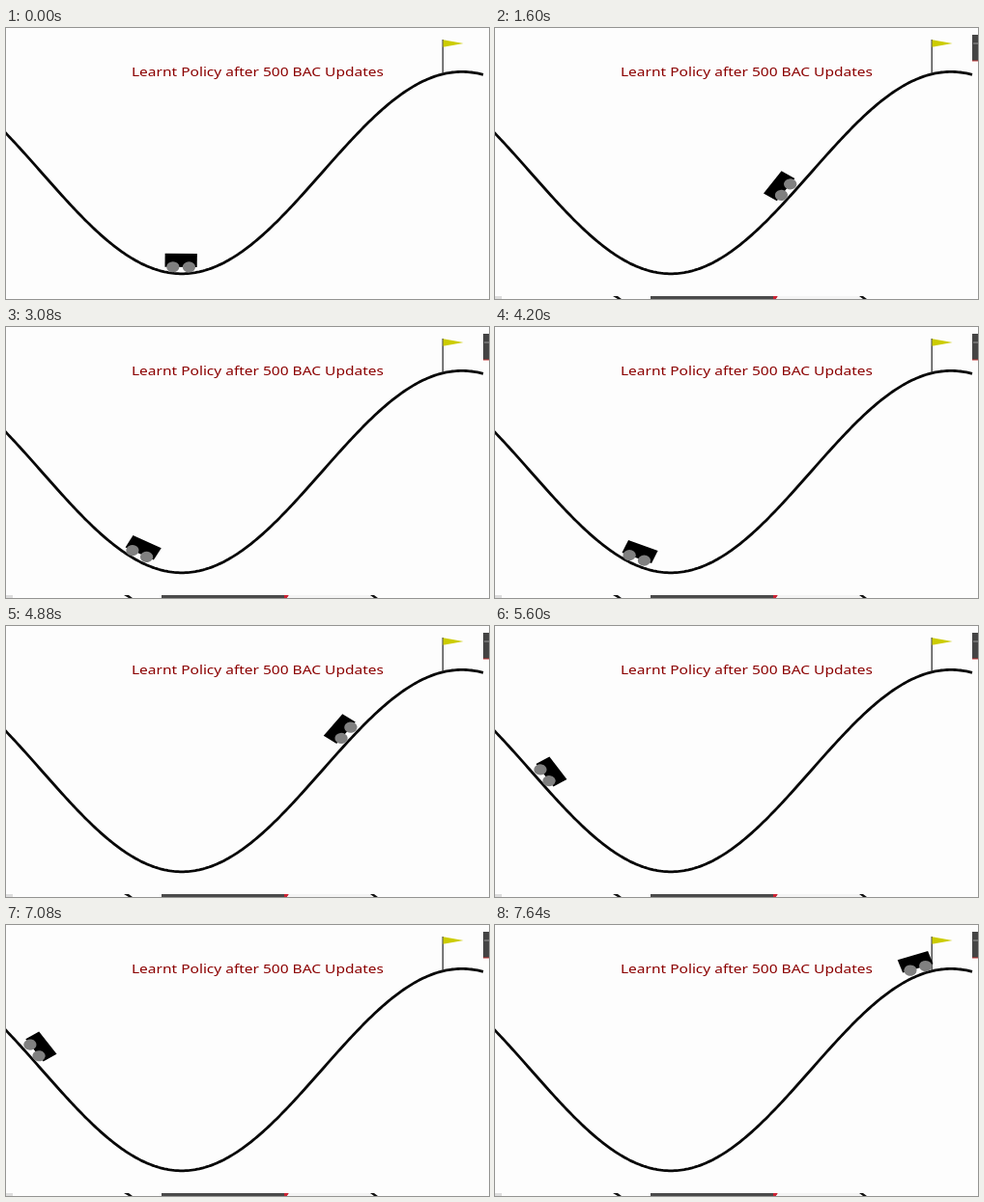
An HTML page for the animation above (7680 ms loop, 500 by 281 pixels).

```html
<!DOCTYPE html>
<html lang="en">
<head>
<meta charset="utf-8">
<title>Mountain car</title>
<style>
  html, body { margin: 0; width: 100%; height: 100%; overflow: hidden; background: #fdfdfd; }
  svg { display: block; width: 500px; height: 281px; }
  text { font: 18.65px "Noto Sans", "Open Sans", sans-serif; fill: #8b0000; }
</style>
</head>
<body>
<svg viewBox="0 0 500 281">
  <!-- the whole scene is squashed to .831 : .697, text and car alike -->
  <text transform="translate(130 49.6) scale(.831 .697)">Learnt Policy after 500 BAC Updates</text>
  <path id="track" fill="none" stroke="#080808" stroke-width="2.8"/>
  <path d="M452.2 12V47" stroke="#333" stroke-width="1.3"/>
  <path d="M452.5 12.3L473.5 16L452.5 19.7Z" fill="#cc0"/>
  <g id="car">
    <rect x="-20" y="-30" width="40" height="20"/>
    <g fill="#808080"><circle cx="-10" cy="-10" r="8"/><circle cx="10" cy="-10" r="8"/></g>
  </g>
  <g id="edges">
    <path d="M494 7h6v27h-6z" fill="#444"/>
    <path d="M495 16h5" stroke="#999"/>
    <path d="M494 34h6" stroke="#b33"/>
    <path d="M0 278h7v3h-7z" fill="#ddd"/>
    <path d="M161 278h128v3h-128z" fill="#4a4a4a"/>
    <path d="M288 278h5l-2 3h-3z" fill="#c23"/>
    <path d="M293 278h85v3h-87z" fill="#f4f4f4"/>
    <path d="M122 278h5l4 3h-4zM377 278h4l4 3h-4z" fill="#111"/>
  </g>
</svg>
<script>
const LOOP = 7680, HOLD = 960, STEP = 40;
const VALLEY = 182, HALF = 290;
const el = id => document.getElementById(id);
const phase = x => (x - VALLEY) * Math.PI / HALF;
const height = x => 150.1 + 104.7 * Math.cos(phase(x));

// Turning points of the swing: [step, x]
const turns = [[0, 181], [16.5, 308.5], [30, 147], [44, 300], [57.7, 100.5], [71.4, 366],
  [87, 76], [102.2, 392], [118, 41], [136.9, 425], [154.4, 22], [169.8, 455]];

function carX(n) {
  const i = turns.findIndex(p => p[0] > n);
  const [n0, x0] = turns[i - 1], [n1, x1] = turns[i];
  return x0 + (x1 - x0) * (1 - Math.cos(Math.PI * (n - n0) / (n1 - n0))) / 2;
}

let d = "";
for (let x = -4; x <= 494; x += 2) d += (d ? "L" : "M") + x + " " + height(x).toFixed(2);
el("track").setAttribute("d", d);

function draw(now) {
  const t = now % LOOP;
  const n = t < HOLD ? 0 : Math.floor((t - HOLD) / STEP) + 1;
  const x = carX(n);
  const tilt = -Math.sin(phase(x)) * 180 / Math.PI;
  el("car").setAttribute("transform",
    `translate(${x} ${height(x)}) scale(.831 .697) rotate(${tilt})`);
  el("edges").style.display = n ? "" : "none";
}

const start = performance.now();
function frame() {
  draw(performance.now() - start);
  requestAnimationFrame(frame);
}
frame();
</script>
</body>
</html>
```
